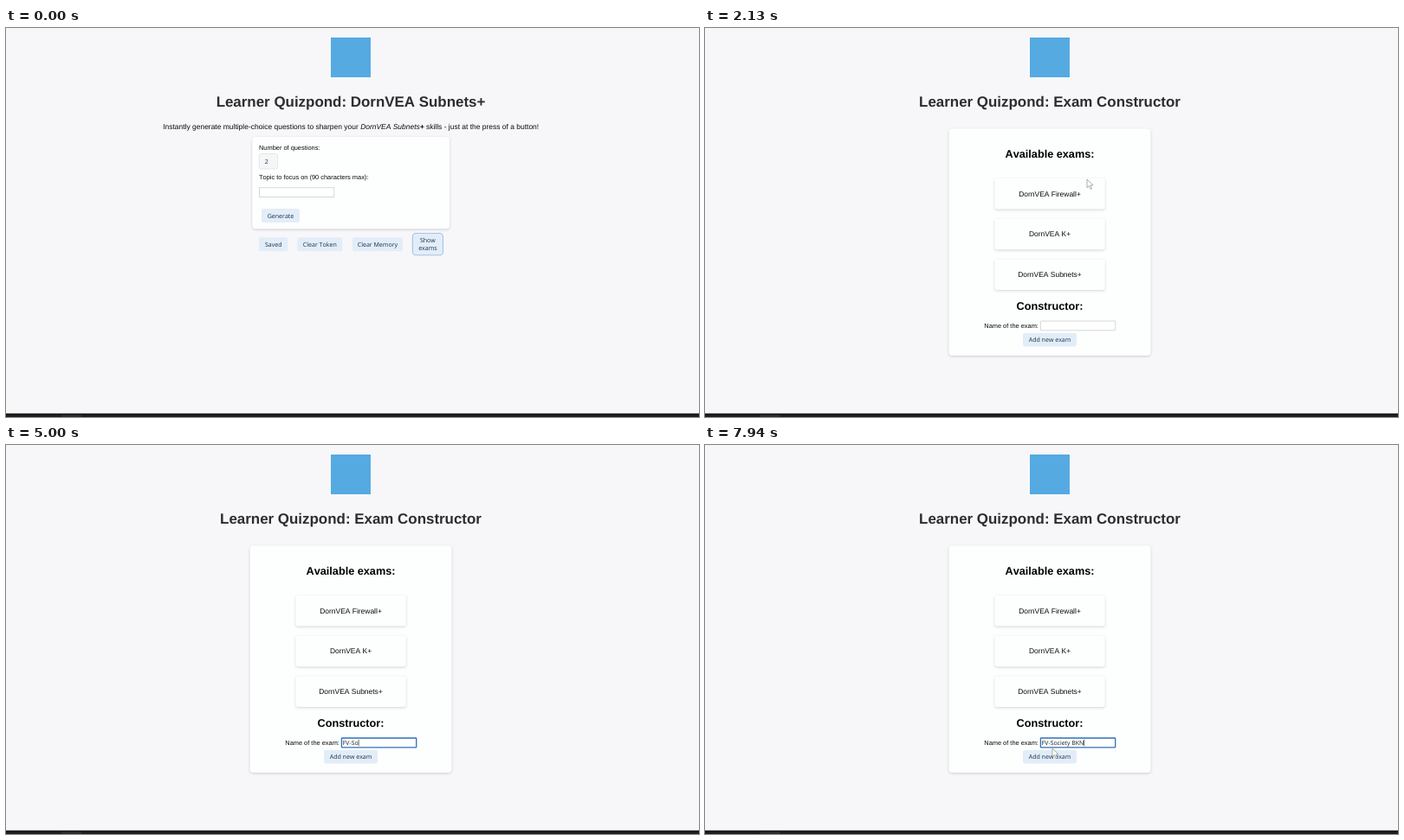
An HTML page for the animation above (8000 ms loop, 800 px wide and 450 px high).

```html
<!DOCTYPE html>
<html lang="en">
<head>
<meta charset="utf-8">
<title>Exam constructor</title>
<style>
  html, body { margin: 0; width: 100%; height: 100%; overflow: hidden; background: #f7f7fa; }
  svg { display: block; width: 800px; height: 450px; }
  text { font-family: "Liberation Sans", Arial, sans-serif; font-size: 8.467px; fill: #0c0c0c; font-kerning: none; white-space: pre; text-rendering: geometricPrecision; }
  .mid { text-anchor: middle; }
  .title { font-size: 16.93px; font-weight: bold; fill: #2d2d2d; }
  .heading { font-size: 12.7px; font-weight: bold; fill: #000; }
  .label { font-size: 7.41px; }
  .ui { font-family: "Open Sans", "Noto Sans", sans-serif; font-size: 7.05px; fill: #17324e; }
  .value { font-size: 6.9px; fill: #1a1a1a; }
  .panel { fill: #fdfffe; filter: drop-shadow(0 1px 1.6px rgba(0, 0, 0, .17)); }
  .button { fill: #e3edf8; }
  .field { fill: #fff; stroke: #c6c6c6; stroke-width: .7; }
  .count { fill: #f6f6f8; stroke: #dedee2; }
  .focused { stroke: #2f70b7; stroke-width: 1.3; }
  .ring { stroke: #a3c4e4; stroke-width: 1.1; rx: 3.8px; }
  .hovered { fill: #cfe1f5; }
  .pointer { fill: #fff; stroke: #777; stroke-width: .6; stroke-linejoin: round; }
  .bar { fill: #1d1d1d; }
  .tab { fill: #2c2c2c; }
</style>
</head>
<body>
<svg id="stage" viewBox="0 0 800 450"></svg>
<script>
const LOOP = 8000, PAGE_SWITCH = 1750, FOCUS_AT = 3060;
const stage = document.getElementById("stage");

function add(parent, tag, attrs = {}, content = "") {
  const el = document.createElementNS("http://www.w3.org/2000/svg", tag);
  for (const key in attrs) el.setAttribute(key, attrs[key]);
  el.textContent = content;
  parent.append(el);
  return el;
}
const box = (parent, cls, x, y, width, height, rx = 0) =>
  add(parent, "rect", { class: cls, x, y, width, height, rx });
const label = (parent, cls, x, y, content) => add(parent, "text", { class: cls, x, y }, content);

function button(parent, x, y, width, height, ...lines) {
  const rect = box(parent, "button", x, y, width, height, 2.8);
  const first = y + height / 2 + 2.5 - (lines.length - 1) * 4.4;
  lines.forEach((line, i) => label(parent, "ui mid", x + width / 2, first + i * 8.8, line));
  return rect;
}

// Shared page chrome
add(stage, "rect", { x: 375, y: 11, width: 46, height: 46, fill: "#55aae2" });
box(stage, "bar", 0, 445.8, 800, 4.2);
box(stage, "tab", 64, 447.5, 23, 2.5);

// Question generator page
const quiz = add(stage, "g");
label(quiz, "title mid", 398, 91, "Learner Quizpond: DornVEA Subnets+");
const intro = label(quiz, "mid", 398.2, 116.5, "Instantly generate multiple-choice questions to sharpen your ");
add(intro, "tspan", { "font-style": "italic" }, "DornVEA Subnets");
add(intro, "tspan", { "font-style": "italic", "font-weight": "bold" }, "+");
add(intro, "tspan", {}, " skills - just at the press of a button!");
box(quiz, "panel", 284.3, 126, 227.7, 106.3, 4);
label(quiz, "label", 292, 141, "Number of questions:");
box(quiz, "field count", 292.4, 145.5, 21.2, 17.5, 2.2);
label(quiz, "ui", 298.7, 157, "2");
label(quiz, "label", 292, 175.3, "Topic to focus on (90 characters max):");
box(quiz, "field", 292.4, 184.8, 86.4, 10.6);
button(quiz, 295, 209, 44, 16, "Generate");
button(quiz, 292, 242.3, 33.5, 16, "Saved");
button(quiz, 336.3, 242.3, 52, 16, "Clear Token");
button(quiz, 399.8, 242.3, 58.2, 16, "Clear Memory");
const showExams = button(quiz, 469.3, 237.5, 35.2, 25.3, "Show", "exams");
showExams.classList.add("ring");

// Exam constructor page
const exams = add(stage, "g");
label(exams, "title mid", 398, 91, "Learner Quizpond: Exam Constructor");
box(exams, "panel", 281.5, 116.5, 233, 262.5, 4);
label(exams, "heading mid", 398, 149.6, "Available exams:");
["DornVEA Firewall+", "DornVEA K+", "DornVEA Subnets+"].forEach((name, i) => {
  const y = 174 + i * 46.7;
  box(exams, "panel", 334.4, y, 127.4, 35.6, 3);
  label(exams, "mid", 398, y + 20.5, name);
});
label(exams, "heading mid", 398, 325.6, "Constructor:");
label(exams, "label", 322.3, 347, "Name of the exam:");
const nameField = box(exams, "field", 387.4, 339, 86.3, 10.8, .6);
const nameText = label(exams, "ui value", 388.8, 347, "");
const caret = add(exams, "rect", { y: 340.8, width: .7, height: 7.4, fill: "#222" });
button(exams, 367, 352.7, 62, 15.8, "Add new exam");

// Pointer shapes, each with its hot spot at 0,0
const pointer = add(stage, "g", { class: "pointer" });
const shapes = {
  arrow: add(pointer, "path", { d: "M0 0V9.6L2.3 7.6L4 11.4L5.6 10.7L3.9 7L7 6.8Z" }),
  hand: add(pointer, "path", {
    d: "M-1 0Q0-1 1 0V4Q2 3.2 2.8 4.2Q3.8 3.6 4.5 4.7Q5.8 4.4 5.8 5.8V8.5L4.8 11.5H-.5L-3.6 7Q-3.8 5.2-2.2 5.8L-1 7Z"
  }),
  beam: add(pointer, "path", { d: "M-1.4-4H1.4M0-4V4M-1.4 4H1.4" })
};

// time, x, y
const routes = [
  [[200, 560, 444], [760, 496.5, 250.5], [1750, 496.5, 250.5], [2130, 441, 175],
   [2350, 438, 205], [2900, 430, 344.5], [3810, 430, 344.5]],
  [[7440, 432, 344], [7700, 416, 346], [7940, 401, 351], [8000, 400, 353]]
];

const typed = "FV-Society BKN";
const keyTimes = [3810, 4060, 4440, 4750, 5000, 5310, 5440, 5690, 5810, 6000, 6130, 6560, 6700, 6850];

function pointerAt(t) {
  const route = routes.find(r => t >= r[0][0] && t < r[r.length - 1][0]);
  if (!route) return null;
  const i = route.findIndex(point => point[0] > t);
  const [t0, x0, y0] = route[i - 1], [t1, x1, y1] = route[i];
  const p = (t - t0) / (t1 - t0), eased = p * p * (3 - 2 * p);
  return [x0 + (x1 - x0) * eased, y0 + (y1 - y0) * eased];
}
const inside = (x, y, left, top, right, bottom) => x > left && x < right && y > top && y < bottom;
const show = (el, visible) => { el.style.display = visible ? "" : "none"; };

function draw(t) {
  const onQuiz = t < PAGE_SWITCH;
  show(quiz, onQuiz);
  show(exams, !onQuiz);

  const at = pointerAt(t);
  show(pointer, at);
  let hovering = false;
  if (at) {
    const [x, y] = at;
    hovering = onQuiz && inside(x, y, 469, 237, 505, 263);
    const overField = !onQuiz && inside(x, y, 387, 338, 474, 350);
    const kind = hovering ? "hand" : overField ? "beam" : "arrow";
    for (const name in shapes) show(shapes[name], name === kind);
    pointer.setAttribute("transform", `translate(${x} ${y})`);
  }
  showExams.classList.toggle("hovered", hovering);

  const focused = t >= FOCUS_AT;
  nameField.classList.toggle("focused", focused);
  const length = keyTimes.filter(time => time <= t).length;
  nameText.textContent = typed.slice(0, length);
  const lastKey = length ? keyTimes[length - 1] : FOCUS_AT;
  const caretOn = focused && (t - lastKey) % 1000 < 500;
  show(caret, caretOn);
  if (caretOn) caret.setAttribute("x", 388.9 + (length ? nameText.getComputedTextLength() : 0));
}

const start = performance.now();
function tick() {
  draw((performance.now() - start) % LOOP);
  requestAnimationFrame(tick);
}
tick();
</script>
</body>
</html>
```
